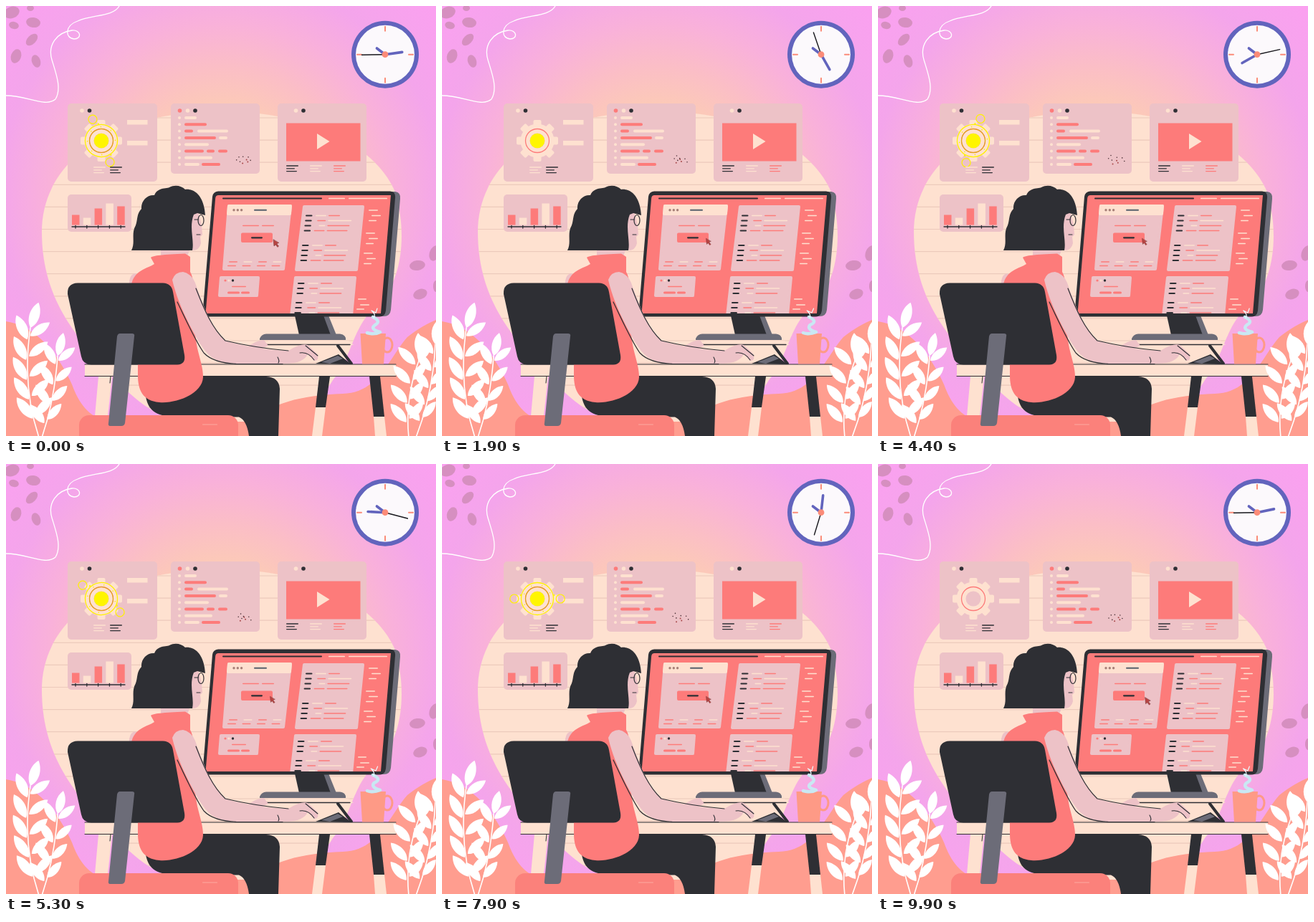
An HTML page that plays this animation: 600 px wide and 600 px high, repeating every 10 s.

```html
<!DOCTYPE html>
<html lang="en">
<head>
<meta charset="utf-8">
<title>At the desk</title>
<style>
html, body { margin: 0; width: 100%; height: 100%; overflow: hidden; }
svg { display: block; width: 100vw; height: 100vh; }
</style>
</head>
<body>
<svg id="stage" viewBox="0 0 600 600" stroke-linecap="round" stroke-linejoin="round"></svg>
<script>
const LOOP = 10000;
const C = {
  dark: '#2e2f34', grey: '#6c6c78', red: '#fd7b7a', cream: '#fee1d0', pink: '#edc2c7',
  salmon: '#ff9d8f', mug: '#fe9a86', blue: '#6264bd', yellow: '#fff200', mauve: '#d68fc0'
};

const path = (d, fill, more = '') => `<path d="${d}" fill="${fill}" ${more}/>`;
const stroke = (d, color, width = 1, more = '') =>
  path(d, 'none', `stroke="${color}" stroke-width="${width}" ${more}`);
const line = (x1, y1, x2, y2, color, width = 1) => stroke(`M${x1} ${y1}L${x2} ${y2}`, color, width);
const bar = (x1, x2, y, color, width = 1.6) =>
  line(x1 + width / 2, y, x2 - width / 2, y, color, width);
const rect = (x, y, w, h, fill, r = 0) =>
  `<rect x="${x}" y="${y}" width="${w}" height="${h}" rx="${r}" fill="${fill}"/>`;
const dot = (x, y, r, fill) => `<circle cx="${x}" cy="${y}" r="${r}" fill="${fill}"/>`;
const ring = (x, y, r, color, width) =>
  `<circle cx="${x}" cy="${y}" r="${r}" fill="none" stroke="${color}" stroke-width="${width}"/>`;
const group = (id, body) => `<g id="${id}">${body}</g>`;
const repeat = (n, fn) => Array.from({ length: n }, (_, i) => fn(i)).join('');
const polar = (r, deg) => [r * Math.cos(deg * Math.PI / 180), r * Math.sin(deg * Math.PI / 180)];

const blob = (x, y, rx, ry, turn) =>
  `<ellipse cx="${x}" cy="${y}" rx="${rx}" ry="${ry}" fill="${C.mauve}" transform="rotate(${turn} ${x} ${y})"/>`;

const textBlock = (x, y, color) =>
  bar(x, x + 17, y, color, 1.3) + bar(x, x + 12, y + 3.8, color, 1.3) + bar(x, x + 15, y + 7.6, color, 1.3);

// A slanted sheet given by its top and bottom edges, rounded by its outline.
const sheet = (l1, r1, top, l2, r2, bottom, fill, round = 4) =>
  path(`M${l1} ${top}H${r1}L${r2} ${bottom}H${l2}Z`, fill, `stroke="${fill}" stroke-width="${round}"`);

function backdrop() {
  return `<defs><radialGradient id="sky" gradientUnits="userSpaceOnUse" cx="300" cy="265" r="430">
      <stop offset="0" stop-color="#fdd3ac"/><stop offset=".28" stop-color="#fccbb6"/>
      <stop offset=".42" stop-color="#fbbec6"/><stop offset=".56" stop-color="#f9b1da"/>
      <stop offset=".72" stop-color="#f4a5eb"/><stop offset="1" stop-color="#fd9ff2"/></radialGradient>
    <clipPath id="wall"><path d="M50 315C50 215 150 147 300 147C440 147 522 205 544 262C560 320 552 385 520 415C482 447 484 490 456 522C430 570 340 590 250 580C200 575 160 530 140 505C90 455 50 400 50 315Z"/></clipPath>
    <clipPath id="screen"><path d="M296 264H537L523 429H278.500L292 270Q292 264 296 264Z"/></clipPath></defs>`
    + rect(0, 0, 600, 600, 'url(#sky)')
    + blob(8, 9, 11, 8, -20) + blob(34, 3, 5, 4, 0) + blob(11, 27, 7, 5, 15) + blob(38, 23, 10, 7, 8)
    + blob(36, 47, 10, 6, -45) + blob(14, 70, 7, 10, 20) + blob(42, 77, 6, 9, -20)
    + blob(574, 362, 11, 7, -8) + blob(598, 345, 7, 11, 20) + blob(578, 402, 10, 7, -20) + blob(600, 391, 4, 8, 0)
    + stroke('M158 0C150 15 120 12 100 21C82 27 82 45 95 46C106 46 105 33 92 34C70 37 58 55 64 75C70 95 78 115 69 130C55 142 30 125 0 125', '#fff', 1.3)
    + `<g clip-path="url(#wall)">` + rect(0, 0, 600, 600, C.cream)
    + repeat(14, i => line(40, 156 + i * 31.1, 560, 156 + i * 31.1, '#eccabc', 1.2)) + '</g>'
    + path('M0 440C45 447 75 490 92 528C102 555 115 572 140 580H340C370 555 410 543 470 541C520 540 535 490 560 462C575 450 590 442 600 438V600H0Z', C.salmon);
}

function gear() {
  const teeth = repeat(8, i => `<rect x="-5.5" y="-29" width="11" height="12" rx="2" fill="${C.cream}" transform="rotate(${i * 45})"/>`);
  const orbit = ring(0, 0, 22.5, C.yellow, 1.3) + ring(0, 0, 16.5, '#dcae10', 1.1)
    + repeat(2, i => {
      const [x, y] = polar(32.2, i * 180);
      return ring(x, y, 6, C.yellow, 1.2) + dot(x * .72, y - 5, 1.2, C.yellow);
    })
    + repeat(8, i => { const [x, y] = polar(19.5, i * 45 + 20); return dot(x, y, .8, C.yellow); });
  return `<g transform="translate(133 188)">${teeth}${dot(0, 0, 23.5, C.cream)}${ring(0, 0, 16.5, C.red, 1.3)}${dot(0, 0, 10.5, C.pink)}`
    + group('glow', dot(0, 0, 10.3, '#fff500')) + group('orbit', orbit) + '</g>';
}

function panels() {
  const codeRows = [
    [[249, 266, 0]], [[249, 280, 1]], [[249, 261, 1], [267, 310, 0]], [[249, 293, 1], [297, 309, 0]],
    [[249, 283, 0]], [[249, 276, 1], [280, 291, 1], [296, 309, 1]], [[249, 288, 0]], [[249, 270, 0], [273, 299, 1]]
  ];
  const chart = [[14, 1], [10, 0], [23, 1], [30, 0], [26, 1]];
  return rect(86, 136, 125, 109, C.pink, 5) + dot(106, 146, 2.8, C.cream) + dot(116.5, 146, 2.8, C.dark)
    + rect(169, 159, 28.5, 6.5, C.cream) + rect(169, 188, 28.5, 6.5, C.cream) + gear()
    + textBlock(122, 225, C.cream) + textBlock(145, 225, C.dark)
    + rect(230, 136, 124, 98, C.pink, 5) + dot(242.5, 146, 2.8, C.red) + dot(253.5, 146, 2.8, C.cream) + dot(264, 146, 2.8, C.dark)
    + codeRows.map((row, i) => {
      const y = 156 + i * 9.3;
      return dot(242, y, 2, C.cream) + row.map(([a, b, hot]) => bar(a, b, y, hot ? C.red : C.cream, 4)).join('');
    }).join('')
    + group('specks', repeat(9, i => dot(0, 0, i % 3 ? .8 : 1, i % 3 ? '#4a3036' : '#a8484a')))
    + rect(379, 136, 124, 109, C.pink, 5) + dot(404.5, 146, 2.8, C.cream) + dot(415, 146, 2.8, C.dark)
    + rect(391, 163.5, 103.5, 53, C.red) + path('M434 178L451.5 189L434 200Z', C.cream)
    + textBlock(391, 223, C.dark) + textBlock(424, 223, C.cream) + textBlock(457, 223, C.red)
    + rect(86, 263, 89, 52, C.pink, 5)
    + chart.map(([h, hot], i) => rect(92 + i * 15.8, 305.5 - h, 10.5, h, hot ? C.red : C.cream)).join('')
    + line(92, 308, 166, 308, C.dark, 1.3) + repeat(5, i => line(97 + i * 15.8, 306.5, 97 + i * 15.8, 310, C.dark, 1.3));
}

// Rows of dark keys with paired code strokes, slanting with the screen.
const codeList = (x, y, n) => repeat(n, i => {
  const rowY = y + i * 7, left = x - i * .8, end = 40 + (i * 17) % 19;
  return bar(left, left + 9.5, rowY, C.dark, 2.2)
    + bar(left + 14 + (i % 3) * 3, left + 29, rowY, i % 2 ? C.red : C.cream)
    + bar(left + 32, left + end + 8, rowY, i % 3 === 1 ? C.cream : C.red);
});

function monitor() {
  const sideLines = (x, y) => bar(x, x + 13, y, C.cream) + bar(x + 4, x + 17, y + 7.5, C.cream) + bar(x, x + 11, y + 14.5, C.cream);
  const ui = rect(260, 255, 300, 190, C.red)
    + bar(302, 441, 268.5, C.dark, 2) + bar(450, 473, 268.5, C.cream, 1.7) + bar(478, 532, 268.5, C.cream, 1.7)
    + sheet(311, 397, 279, 304, 387, 367, C.pink) + sheet(311, 397, 279, 310, 396, 290, C.cream)
    + repeat(3, i => dot(318 + i * 5.3, 284.8, 1.7, '#a78078')) + bar(346, 364, 284.8, '#56606c', 2)
    + bar(330, 353, 306.5, C.red) + bar(357, 374, 306.5, C.red) + rect(328, 316.5, 44, 13.5, C.red, 2) + bar(342, 358, 323.3, C.dark, 2.2)
    + repeat(4, i => bar(311 + i * 20.5, 323 + i * 20.5, 357, i % 2 ? C.cream : C.red) + bar(309 + i * 20.5, 321 + i * 20.5, 362.5, C.red))
    + sheet(416, 498, 280, 405, 489, 368, C.pink) + codeList(418, 292.5, 4) + codeList(413, 334, 4)
    + sideLines(506, 285) + sideLines(502, 317) + sideLines(499, 345)
    + sheet(300, 352, 379, 298, 350, 404, C.pink)
    + dot(306, 383, 1.6, C.red) + dot(311, 383, 1.6, C.cream) + dot(316.5, 383, 1.7, C.dark)
    + bar(315, 335, 391.5, C.red) + bar(309, 326, 400, C.red, 3) + bar(328, 340, 400, C.red, 3)
    + sheet(404, 487, 379, 398, 482, 432, C.pink) + codeList(407, 387, 3) + codeList(404, 414, 3)
    + bar(491, 503, 409, C.cream) + bar(494, 507, 417, C.cream) + bar(489, 500, 423, C.cream);
  return path('M403 432H446L459 459H409Z', C.dark) + path('M443 432H450L461 459H453Z', C.grey)
    + path('M366 467H478L485 473H363Z', C.cream) + line(362, 472.5, 480, 472.5, C.dark, 1.3)
    + path('M354 464Q357 457 364 457.5H466Q475 459 474 466H354Z', C.grey)
    + path('M535 259H543Q551 260 550 269L537 424Q536 433 527 433H518Z', C.grey)
    + path('M296 258.500H536Q544 259 543 268L530 425Q529 433.500 521 433.500H274L288 266Q289 259 296 258.500Z', C.dark)
    + `<g clip-path="url(#screen)">${ui}</g>`
    + group('cursor', path('M0 0L1 9L3.200 7L6 10.500L7.500 9L4.700 5.800L7.500 4.500Z', '#b84442', 'stroke="#6b3034" stroke-width=".5"'));
}

function desk() {
  return path('M129 517H148L142 572H124Z', C.cream) + line(146, 517, 145, 526, C.dark)
    + path('M437 517H452L446 560H432Z', C.dark) + path('M432 560H446L441 600H427Z', C.cream)
    + path('M507 517H522L528 573H513Z', C.dark) + path('M513 573H528L531 600H515Z', C.cream)
    + line(463, 474, 482, 499, C.dark, 4)
    + rect(110, 500, 434, 17, C.cream) + line(110, 500, 544, 500, C.dark, 1.2) + line(110, 516.5, 544, 516.5, C.dark, 1.2)
    + path('M319 498H381V500H319ZM432 499L464 486L482 500Z', C.dark) + path('M440 497L463 488L470 492L452 499Z', C.grey)
    + `<ellipse cx="532" cy="473" rx="7" ry="10" fill="none" stroke="${C.mug}" stroke-width="3"/>`
    + path('M494.500 457H530L527 499.500H497Z', C.mug)
    + group('steam', stroke('', '#c9e8f3', 4.5) + stroke('', '#eefaff', 1.2));
}

function woman() {
  return path('M195 545C199 567 212 573 240 573.500H325Q336 578 339 600H380L382 534Q381 518 363 517H250Z', C.dark)
    + rect(102, 571, 222, 50, '#fb817b', 14) + bar(274, 295, 584, '#fcaaa0', 1)
    + path('M172 389Q171 377 179 373L190 378V390Z', C.pink)
    + path('M216 335H258L252 352H216Z', C.pink)
    + path('M175 389C178 369 198 366 207 360L202 351Q205 347 250 345.500L257 350V371C266 384 261 440 265 465C267 485 275 500 275 518C274 540 240 555 214 553C190 551 184 535 184 515V470Z', C.red)
    + path('M256 289L268 288Q271 297 273 306L274 319L271 322L272 331Q270 341 260 341H243V300Z', C.pink)
    + path('M175 341C181 330 174 318 181 306C184 298 182 290 189 283C188 272 197 263 207 264C211 253 224 255 228 253C236 249 245 251 250 256C268 254 277 272 278 292L267 289L262 291C255 309 263 326 260 341Z', C.dark)
    + `<ellipse cx="272" cy="299" rx="4" ry="7.500" fill="none" stroke="${C.dark}" stroke-width="1.200"/>`
    + line(263, 298, 268, 298, C.dark, 1.2) + line(266, 319, 271, 319, C.dark, 1)
    + path('M335 477Q350 466 360 466L366 474L354 480Z', C.pink)
    + path('M232 382Q236 371 247 371Q261 374 266 392C277 422 287 449 306 467C335 476 365 480 394 481Q412 470 421 473L434 485Q438 495 430 495L421 486Q415 498 393 499H322C288 498 281 486 270 470C255 445 238 410 232 382Z', C.pink)
    + stroke('M265 394C277 425 288 450 306 467C335 474 360 478 394 481M239 413C254 444 264 467 276 484Q289 498 322 499.500H386', C.dark, 1.2)
    + stroke('M379 490Q382 495 380 498M410 484Q422 482 430 494M418 474L435 488', C.dark, 1.1)
    + path('M100 386.500H219Q231 387 233 399L249 487Q251 500 239 500.500H119Q107 500 105 489L86 402Q85 387 100 386.500Z', C.dark)
    + path('M159 457H176Q180 457 179 461L166 582Q165 586 161 586H146Q142 586 143 582L155 461Q156 457 159 457Z', C.grey);
}

const leaf = (x, y, turn, size) =>
  `<path d="M0 0C${size * .27} ${-size * .25} ${size * .25} ${-size * .7} 0 ${-size}C${-size * .26} ${-size * .7} ${-size * .24} ${-size * .25} 0 0Z" fill="#fff" transform="translate(${x} ${y}) rotate(${turn})"/>`;

// A bent stem from foot to tip with leaves on both sides and one on top.
function sprig(x, y, cx, cy, tipX, tipY, pairs, tilt, size) {
  const at = (a, b, c, u) => (1 - u) ** 2 * a + 2 * u * (1 - u) * b + u * u * c;
  return stroke(`M${x} ${y}Q${cx} ${cy} ${tipX} ${tipY}`, '#fff', 1.6)
    + leaf(tipX, tipY, tilt, size)
    + repeat(pairs, i => {
      const u = .16 + i * .72 / (pairs - 1), px = at(x, cx, tipX, u), py = at(y, cy, tipY, u);
      const lean = tilt * u;
      return leaf(px - 2, py - 3, lean - 40, size) + leaf(px + 2, py - 8, lean + 40, size * .9);
    });
}

function plants() {
  return sprig(46, 602, 22, 530, 34, 449, 5, 18, 37) + sprig(50, 602, 68, 550, 72, 488, 4, 14, 33)
    + sprig(562, 602, 556, 545, 578, 490, 4, -5, 34) + sprig(572, 602, 596, 540, 599, 472, 5, 3, 32);
}

function clock() {
  const hand = (id, length, color, width) => group(id, line(0, 0, 0, -length, color, width));
  return `<g transform="translate(529 67.7)">${dot(0, 0, 47, C.blue)}${dot(0, 0, 41, '#fcf9fc')}`
    + repeat(4, i => { const [x, y] = polar(1, i * 90); return line(x * 33, y * 33, x * 39, y * 39, '#fb8b78', 2); })
    + `<g transform="rotate(-53)">${line(0, 0, 0, -14.5, C.blue, 3.6)}</g>`
    + hand('minute', 24, C.blue, 3.6) + hand('second', 32.5, '#17171c', 1.4) + dot(0, 0, 4.4, '#fb8b78') + '</g>';
}

const stage = document.getElementById('stage');
stage.innerHTML = backdrop() + panels() + monitor() + desk() + woman() + plants() + clock();
const $ = id => document.getElementById(id);
const specks = [...$('specks').children], steam = [...$('steam').children];

const clamp = v => Math.min(1, Math.max(0, v));
const ease = u => .5 - .5 * Math.cos(Math.PI * clamp(u));
const within = (t, a, b) => t >= a && t < b;
const turn = (id, deg) => $(id).setAttribute('transform', `rotate(${deg})`);

function follow(keys, t) {
  const i = keys.findIndex(k => k[0] > t);
  const [t0, a] = keys[i - 1], [t1, b] = keys[i];
  return a + (b - a) * (t - t0) / (t1 - t0);
}
const orbitKeys = [[0, 68], [3.5, 540], [5.3, 756], [7.9, 1080], [10, 1328]];

function draw(ms) {
  const t = Math.floor(ms % LOOP / 100) / 10;
  const second = Math.floor(t);

  turn('minute', 82 + t * 36);
  turn('second', 269 + 36 * (second + ease((t - second) / .65)));

  turn('orbit', follow(orbitKeys, t));
  const orbitHidden = within(t, 1.5, 2.4) || within(t, 6.2, 7) || t >= 9.6;
  $('orbit').style.display = orbitHidden ? 'none' : '';
  $('glow').style.display = t >= 9.6 ? 'none' : '';

  const phase = (t * .3) % 1, press = ease(Math.min(phase, 1 - phase) / .15);
  $('cursor').setAttribute('transform',
    `translate(${373 - 4.5 * press} ${326 - 1.5 * press}) scale(${1 - .12 * press})`);

  specks.forEach((s, i) => {
    const [x, y] = polar(12 * Math.sqrt((i + .5) / 9), i * 137.5);
    const swing = t * Math.PI * .6 + i * 2.1;
    s.setAttribute('cx', 331 + x + 1.8 * Math.cos(swing));
    s.setAttribute('cy', 214.5 + y * .5 + 1.3 * Math.sin(swing));
  });

  const sway = 1.5 * Math.sin(t * Math.PI * 1.8);
  steam[0].setAttribute('d', `M504 456Q${514 + sway} 459 522 455Q${507 - sway} 451 ${515 + sway} 445Q${524 - sway} 440 512 434`);
  steam[1].setAttribute('d', `M513 435Q${517 + sway} 431 ${510 + sway * .5} 425L516 428L${518 - sway * .4} 422`);
}

function tick(now) {
  draw(now);
  requestAnimationFrame(tick);
}
draw(0);
requestAnimationFrame(tick);
</script>
</body>
</html>
```
